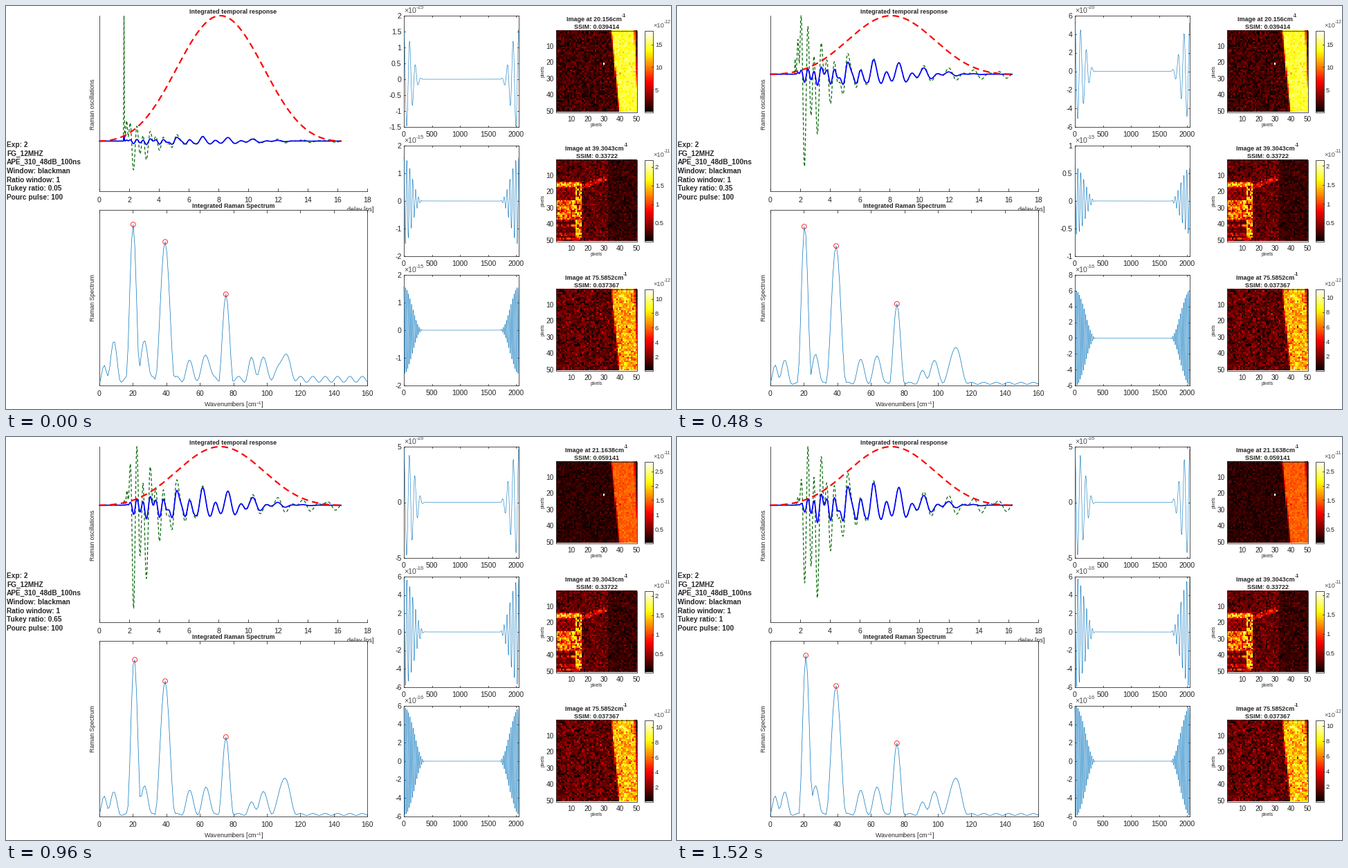
These frames come from a looping animation (961 by 583 pixels, 1600 ms). A matplotlib script:

```python
import numpy as np
import matplotlib.pyplot as plt
from matplotlib.animation import FuncAnimation
from matplotlib.patches import Circle, Rectangle

W, H, DPI = 961, 583, 64
PX = 72 / DPI
FRAMES, INTERVAL = 20, 80
BIN = 1.0078023  # wavenumbers per spectral bin
INK, GREY, BLUE = "#262626", "#4d4d4d", "#0072BD"
THIN = 0.55

plt.rcParams.update({
    "font.family": "Liberation Sans",
    "mathtext.fontset": "custom",
    "mathtext.rm": "Liberation Sans",
})

fig = plt.figure(figsize=(W / DPI, H / DPI), dpi=DPI, facecolor="white")
ax = fig.add_axes([0, 0, 1, 1])
ax.set_axis_off()


# ---------- drawing helpers, all in pixels ----------

def text(x, y, s, size=10.5, ha="center", bold=False, color=INK, z=5):
    return ax.text(x, y + 0.36 * size, s, fontsize=size * PX, ha=ha,
                   va="baseline", color=color, zorder=z,
                   weight="bold" if bold else "normal")


def raised(base, s, size):
    """Superscript at the upper right end of a text."""
    return ax.annotate(s, xy=(1, 1), xycoords=base, ha="left", va="center",
                       fontsize=size * PX, color=base.get_color(),
                       weight=base.get_weight(), zorder=5)


def side_text(x, y, s, size):
    ax.text(x, y, s, fontsize=size * PX, rotation=90, ha="center",
            va="center", color=INK, zorder=5)


def line(x, y, color=INK, width=0.8, dash=None, z=4):
    style = (0, (dash[0] / width, dash[1] / width)) if dash else "-"
    return ax.plot(x, y, color=color, lw=width * PX, ls=style, zorder=z,
                   dash_capstyle="butt", solid_joinstyle="round")[0]


def box(x0, y0, x1, y1, fill="none", z=3):
    ax.add_patch(Rectangle((x0, y0), x1 - x0, y1 - y0, fc=fill, ec=INK,
                           lw=0.8 * PX, zorder=z))


def x_ticks(xs, labels, y, label_y, length, top=None):
    for x, s in zip(xs, labels):
        line([x, x], [y, y - length])
        if top is not None:
            line([x, x], [top, top + length])
        text(x, label_y, f"{s:g}")


def lobe(x, center, width):
    return np.cos(np.pi / 2 * np.clip((x - center) / width, -1, 1)) ** 2


def nice_limits(lo, hi):
    """Tightest round limits with two to seven intervals."""
    options = []
    base = int(np.floor(np.log10(hi - lo)))
    for e in (base - 1, base):
        for m in (1, 2, 5):
            step = m * 10.0 ** e
            a = int(np.floor(lo / step + 1e-9))
            b = int(np.ceil(hi / step - 1e-9))
            if 2 <= b - a <= 7:
                options.append((round((b - a) * step, 9), step, a, b))
    _, step, a, b = min(options)
    return step, a, b


# ---------- temporal response: damped modes after a sharp pulse ----------

T_X, T_SCALE, T_TOP, T_BOTTOM = 135, 21.5, 14, 268
DURATION, START = 16.25, 1.6
t = np.arange(0, DURATION, 0.01)
age = np.maximum(t - START, 0)


def mode(amp, decay, period, peak):
    return (amp * np.exp(-age / decay)
            * np.cos(2 * np.pi * (t - peak) / period))


def blip(amp, center, width):
    return amp * np.exp(-((t - center) / width) ** 2)


ringing = (mode(15, 10, 1.63, 6.95) + mode(39, 5, 0.849, 6.95)
           + mode(195, 1.05, 0.441, 2.51) - 28 * np.exp(-age / 1.4))
pulse = (ringing * (1 - np.exp(-(age / 0.42) ** 2))
         + blip(690, 1.645, 0.03) + blip(130, 1.84, 0.08))
angle = 2 * np.pi * t / DURATION
blackman = 0.42 - 0.5 * np.cos(angle) + 0.08 * np.cos(2 * angle)


def tapered(ratio):
    u = np.clip(age / (1.32 * ratio), 0, 1)
    s = pulse * (1 - np.cos(np.pi * u)) / 2
    return s / s.max()


# ---------- spectrum ----------

S_X, S_TOP, S_BOTTOM, S_RIGHT = 135, 295, 549, 522
S_SCALE = (S_RIGHT - S_X) / 160
wavenumber = np.minimum(BIN * np.arange(160), 160)
bins_x = S_X + S_SCALE * wavenumber
BUMPS = [  # center, half width, height with and without the pulse
    (2.8, 3.5, 18, 26), (8.5, 4.2, 52, 32), (27, 4.2, 60, 43),
    (54, 4.8, 24, 34), (63.8, 4.8, 38, 41), (91, 4.2, 28, 17),
    (98, 5.5, 28, 32), (110.5, 7.5, 36, 53)]


def spectrum(n, spike):
    x = wavenumber
    floor = 3 + 6 * spike
    y = floor * (1 + 0.5 * np.sin(0.85 * x)) * np.minimum(x / 3, 1)
    for center, width, early, late in BUMPS:
        y = y + (spike * early + (1 - spike) * late) * lobe(x, center, width)
    dip = 3.5 * np.exp(-((n - 10) / 3) ** 2)
    main = [(20.1 + 1.1 * n / 19, 4.4, 233 - dip),
            (39.2, 6.2, 208 - n),
            (75.6, 4.7, 118 - 12 * (n / 19) ** 3 + 14 * spike)]
    for center, width, height in main:
        y = np.maximum(y, height * lobe(x, center, width))
    return S_BOTTOM - y


# ---------- filtered signals ----------

M_LEFT, M_RIGHT, SAMPLES = 575, 741, 2048
M_SCALE = (M_RIGHT - M_LEFT) / SAMPLES
PANELS = [(14, 175), (202, 362), (389, 549)]
LEVELS = [(4.85, 0), (5.55, 0.4), (5.5, 0.45)]  # settled level, slow rise
samples = np.arange(SAMPLES)


def packet(k, level, rise, n, spike):
    amp = level + rise * n / 19 + (15.7 - level) * spike
    shift = 12 * (1 - spike)
    d = (samples - shift + SAMPLES / 2) % SAMPLES - SAMPLES / 2
    env = lobe(d, 0, 360) ** (1 + 0.35 * spike)
    return amp * env * np.cos(2 * np.pi * k * samples / SAMPLES)


# ---------- images ----------

I_LEFT, I_RIGHT, I_SIZE = 795, 912, 117.5
I_TOPS = [36, 223, 410]
CELL = I_SIZE / 50
rng = np.random.default_rng(4)
row, col = np.mgrid[0:50, 0:50]


def noise(mean, spread):
    return np.abs(rng.normal(mean, spread, (50, 50)))


def strip_image(peak, floor, level):
    band = (np.clip(col + 1 - 34 - 5 * row / 49, 0, 1)
            * np.clip(48.5 + row / 25 - col, 0, 1))
    return peak * (noise(*floor) * (1 - band) + noise(*level) * band)


def corner_image():
    img = np.where(col < 32, noise(0.13, 0.06), noise(0.07, 0.04))
    shade = rng.random((50, 50))
    stripes = rng.random((50, 1))

    def paint(mask, values):
        img[mask] = values[mask]

    inner = col < 15
    paint(inner & (row >= 13), 0.08 + 0.25 * shade)
    paint(inner & (row >= 37), 0.7 * shade * stripes + 0.08)
    paint(inner & (row >= 25) & (row < 37), 0.1 + 0.5 * shade + 0.3 * stripes)
    paint((col < 16) & (row >= 14) & (row < 17), 0.35 + 0.5 * shade)
    paint((col >= 12) & (col < 16) & (row >= 16) & (row < 48),
          0.15 + 0.65 * shade)
    streak = np.abs(row - 16 + 0.35 * (col - 16)) < 1.6
    paint((col >= 16) & (col < 31) & streak, 0.1 + 0.4 * shade)
    return 2.18 * img


images = [strip_image(18, (0.085, 0.06), (0.79, 0.05)),
          corner_image(),
          strip_image(11.3, (0.13, 0.07), (0.62, 0.1))]
images[0][20, 29] = 28.3
ramp = np.linspace(1, 0, 64)[:, None]


def heat(data, x0, x1, top):
    return ax.imshow(data, cmap="hot", extent=(x0, x1, top + I_SIZE, top),
                     aspect="auto", interpolation="nearest", zorder=2)


# ---------- fixed parts ----------

NOTES = ["Exp: 2", "FG_12MHZ", "APE_310_48dB_100ns", "Window: blackman",
         "Ratio window: 1", "", "Pourc pulse: 100"]
for i, s in enumerate(NOTES):
    text(1, 200.5 + 12.6 * i, s, 10.1, "left", True)

text(328.5, 8, "Integrated temporal response", 8.9, bold=True)
side_text(126, 142, "Raman oscillations", 8.8)
line([T_X, T_X, S_RIGHT], [T_TOP, T_BOTTOM - 0.5, T_BOTTOM - 0.5])
ticks = np.arange(0, 19, 2)
x_ticks(T_X + T_SCALE * ticks, ticks, T_BOTTOM - 0.5, 280, 4)
text(512.5, 294, "delay [ps]", 8.9, z=1)

box(S_X, S_TOP, S_RIGHT, S_BOTTOM, "white", z=2)
text(328.5, 288.5, "Integrated Raman Spectrum", 8.9, bold=True)
side_text(126, 422, "Raman Spectrum", 8.8)
ticks = np.arange(0, 161, 20)
x_ticks(S_X + S_SCALE * ticks, ticks, S_BOTTOM, 560.5, 4, S_TOP)
text(329, 576.5, "Wavenumbers [cm$^{-1}$]", 9)

for top, bottom in PANELS:
    box(M_LEFT, top, M_RIGHT, bottom)
    ticks = np.arange(0, 2001, 500)
    x_ticks(M_LEFT + M_SCALE * ticks, ticks, bottom, bottom + 10, 1.8, top)

shown = []
for top, data in zip(I_TOPS, images):
    bottom = top + I_SIZE
    shown.append(heat(data, I_LEFT, I_RIGHT, top))
    box(I_LEFT, top, I_RIGHT, bottom)
    for v in range(10, 51, 10):
        mark = (v - 0.5) * CELL
        text(I_LEFT + mark, bottom + 9.5, f"{v}", 10)
        text(792, top + mark, f"{v}", 10, "right")
    text(853, bottom + 18.5, "pixels", 6.6)
    side_text(776, top + 58.5, "pixels", 6.6)
    heat(ramp, 922.5, 934.5, top)
    box(922.5, top, 934.5, bottom)

ax.set_xlim(0, W)
ax.set_ylim(H, 0)

moving = []


def add(artist):
    moving.append(artist)
    return artist


def add_power(x, y, power, size):
    base = add(text(x, y, "×10", size, "left", color=GREY))
    add(raised(base, f"{power}", 0.75 * size))


# ---------- parts redrawn each step ----------

def draw_response(ratio):
    green = tapered(ratio)
    step, a, b = nice_limits(green.min(), 1)
    unit = (T_BOTTOM - T_TOP) / (step * (b - a))
    zero = T_TOP + step * b * unit
    x = T_X + T_SCALE * t
    add(line(x, zero - unit * green, "#006400", 1.2, (4.2, 3)))
    add(line(x, zero - unit * green * blackman, "#0000FF", 1.7))
    add(line(x, zero - unit * blackman, "#FF0000", 2.2, (9.5, 6)))


def draw_spectrum(n, spike, peaks):
    y = spectrum(n, spike)
    add(line(bins_x, y, BLUE, 0.7))
    for k in peaks:
        add(ax.add_patch(Circle((bins_x[k], y[k]), 3.4, fc="none", ec="red",
                                lw=0.8 * PX, zorder=6)))


def draw_packet(panel, values):
    top, bottom = panel
    step, a, b = nice_limits(values.min(), values.max())
    unit = (bottom - top) / (step * (b - a))
    zero = top + step * b * unit
    big = step * max(b, -a) >= 10
    for i in range(a, b + 1):
        y = zero - i * step * unit
        for x0, x1 in ((M_LEFT, M_LEFT + 1.8), (M_RIGHT - 1.8, M_RIGHT)):
            add(line([x0, x1], [y, y]))
        label = i * step / (10 if big else 1)
        add(text(571.5, y, f"{label:g}", ha="right"))
    add_power(M_LEFT, top - 7.5, -15 if big else -16, 10.5)
    add(line(M_LEFT + M_SCALE * samples, zero - unit * values, BLUE, THIN))


def draw_image(i, k, ssim, peak, step, power):
    top = I_TOPS[i]
    bottom = top + I_SIZE
    low = 0.005 * peak
    shown[i].set_clim(low, peak)
    title = add(text(850, top - 17.5, f"Image at {k * BIN:.6g}cm", 9,
                     bold=True))
    add(raised(title, "-1", 7))
    add(text(853.5, top - 6, f"SSIM: {ssim}", 9, bold=True))
    add_power(935, top - 8.5, power, 9.2)
    for v in np.arange(step, peak, step):
        y = bottom - I_SIZE * (v - low) / (peak - low)
        add(line([933, 934.5], [y, y]))
        add(text(938, y, f"{v:g}", 9.2, "left"))


def draw(n):
    while moving:
        moving.pop().remove()
    ratio = 0.05 * (n + 1)
    spike = np.exp(-0.55 * n)  # share of the sharp pulse still present
    late = n >= FRAMES // 2
    peaks = (21 if late else 20, 39, 75)

    add(text(1, 263.5, f"Tukey ratio: {ratio:g}", 10.1, "left", True))
    draw_response(ratio)
    draw_spectrum(n, spike, peaks)
    for panel, k, (level, rise) in zip(PANELS, peaks, LEVELS):
        draw_packet(panel, packet(k, level, rise, n, spike))

    shown[0].set_data(images[0] / (10 if late else 1))
    if late:
        draw_image(0, 21, "0.059141", 2.83, 0.5, -11)
    else:
        draw_image(0, 20, "0.039414", 18, 5, -12)
    draw_image(1, 39, "0.33722", 2.18 - 0.08 * n / 19, 0.5, -11)
    draw_image(2, 75, "0.037367", 11.3 - 0.6 * n / 19, 2, -12)
    return moving


anim = FuncAnimation(fig, draw, frames=FRAMES, interval=INTERVAL,
                     init_func=lambda: [], repeat=True, repeat_delay=0)
plt.show()
```
